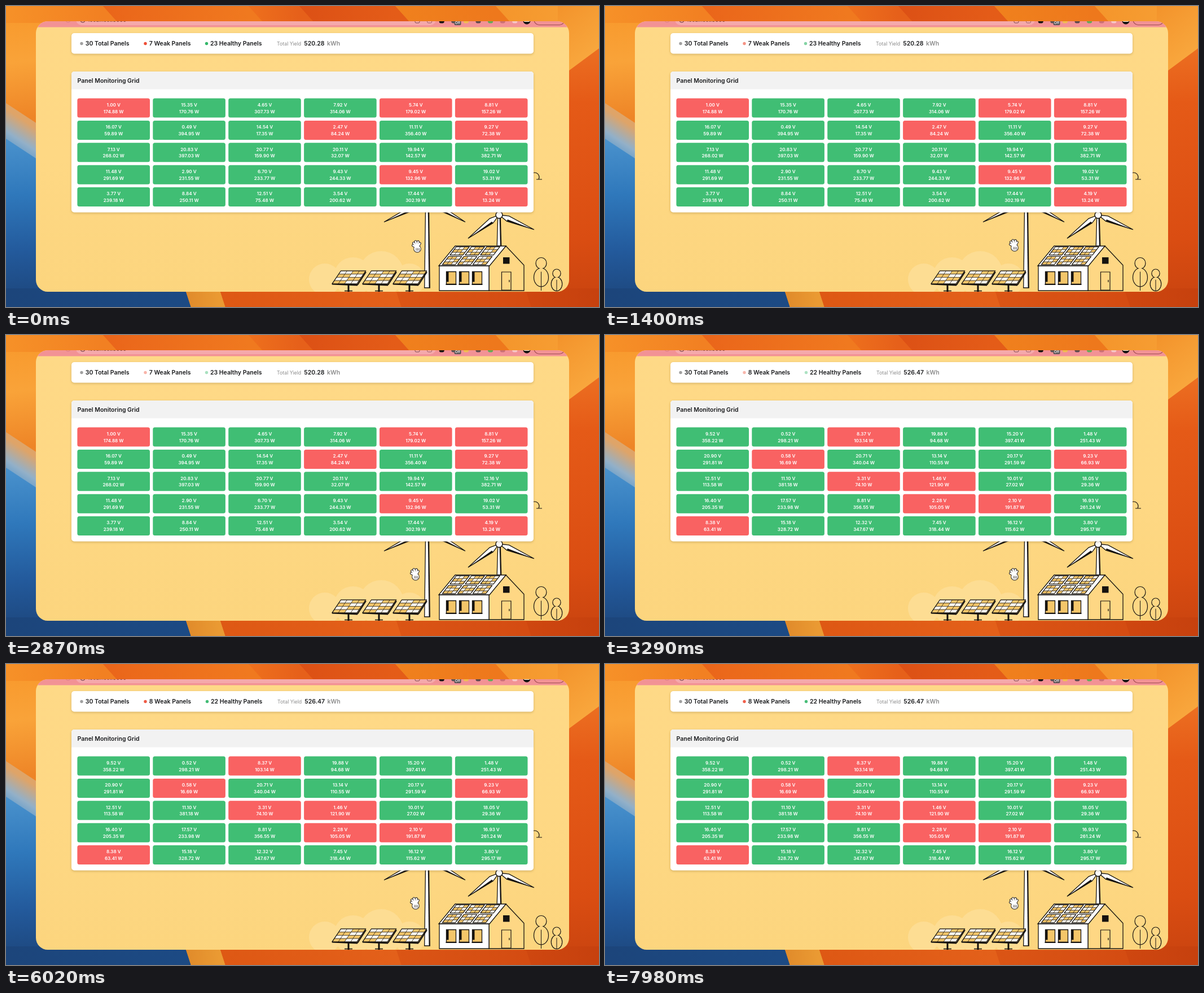
An HTML page with a canvas that plays this animation: 1051 by 533 pixels, repeating every 8 s.

```html
<!DOCTYPE html>
<html lang="en">
<head>
<meta charset="utf-8">
<title>Solar panel monitor</title>
<style>
html, body { margin: 0; width: 100%; height: 100%; overflow: hidden; background: #e8641a; }
canvas { display: block; width: 1051px; height: 533px; }
</style>
</head>
<body>
<canvas id="stage"></canvas>
<script>
const W = 1051, H = 533, LOOP = 8000, REFRESH = 3010;
const RED = '#f96262', GREEN = '#40be74', INK = '#15120f', CREAM = '#fed784', GOLD = '#f4c66a';
const win = { x: 53, y: 27, w: 945, h: 479 };

const canvas = document.getElementById('stage');
const dpr = window.devicePixelRatio || 1;
canvas.width = W * dpr;
canvas.height = H * dpr;
let c = canvas.getContext('2d');

// The text of the cells: volts and watts, before and after the refresh.
const states = [
  { total: '520.28', shift: 0, peak: 0, cells: `
    1.00 174.88, 15.35 170.76, 4.65 307.73, 7.92 314.06, 5.74 179.02, 8.81 157.26,
    16.07 59.89, 0.49 394.95, 14.54 17.35, 2.47 84.24, 11.11 356.40, 9.27 72.38,
    7.13 268.02, 20.83 397.03, 20.77 159.90, 20.11 32.07, 19.94 142.57, 12.16 382.71,
    11.48 291.69, 2.90 231.55, 6.70 233.77, 9.43 244.33, 9.45 132.96, 19.02 53.31,
    3.77 239.18, 8.84 250.11, 12.51 75.48, 3.54 200.62, 17.44 302.19, 4.19 13.24` },
  { total: '526.47', shift: 1, peak: 2250, cells: `
    9.52 358.22, 0.52 298.21, 8.37 103.14, 19.88 94.68, 15.20 397.41, 1.48 251.43,
    20.90 291.81, 0.58 16.69, 20.71 340.04, 13.14 110.55, 20.17 291.59, 9.23 66.93,
    12.51 113.58, 11.10 381.18, 3.31 74.10, 1.46 121.90, 10.01 27.02, 18.05 29.36,
    16.40 205.35, 17.57 233.98, 8.81 356.55, 2.28 105.05, 2.10 191.87, 16.93 261.24,
    8.38 63.41, 15.18 328.72, 12.32 347.67, 7.45 318.44, 16.12 115.62, 3.80 295.17` }
];
for (const s of states) {
  s.cells = s.cells.split(',').map(cell => {
    const [volts, watts] = cell.trim().split(' ');
    return { volts, watts, weak: volts < 10 && watts < 200 };
  });
  s.weak = s.cells.filter(cell => cell.weak).length;
}

function gradient(x0, y0, x1, y1, ...colors) {
  const g = c.createLinearGradient(x0, y0, x1, y1);
  colors.forEach((col, i) => g.addColorStop(i / Math.max(1, colors.length - 1), col));
  return g;
}

function paint(fill, stroke, width = 1.3) {
  if (fill) { c.fillStyle = fill; c.fill(); }
  if (stroke) { c.strokeStyle = stroke; c.lineWidth = width; c.stroke(); }
}

function poly(points, fill, stroke, width) {
  c.beginPath();
  points.forEach(p => c.lineTo(...p));
  c.closePath();
  paint(fill, stroke, width);
}

function line(x0, y0, x1, y1, width = 1.3, color = INK) {
  c.beginPath();
  c.moveTo(x0, y0);
  c.lineTo(x1, y1);
  paint(null, color, width);
}

function box(x, y, w, h, r, fill, stroke, width) {
  c.beginPath();
  c.roundRect(x, y, w, h, r);
  paint(fill, stroke, width);
}

function disc(x, y, r, fill, stroke, width) {
  c.beginPath();
  c.arc(x, y, r, 0, Math.PI * 2);
  paint(fill, stroke, width);
}

function text(str, x, y, size, weight, color, align = 'left') {
  c.font = `${weight} ${size}px Inter, sans-serif`;
  c.textAlign = align;
  c.fillStyle = color;
  c.fillText(str, x, y);
}

// Neighbouring slanted petals along one horizontal edge of the stage.
function petals(y, height, slant, stops) {
  stops.forEach(([x, from, to], i) => {
    const end = i + 1 < stops.length ? stops[i + 1][0] : W + 60;
    poly([[x, y], [end, y], [end + slant, y + height], [x + slant, y + height]],
      gradient(x, 0, end, 0, from, to));
  });
}

function wallpaper() {
  const left = win.x + 20, right = win.x + win.w - 20, bottom = win.y + win.h;
  petals(0, 50, 45, [
    [-60, '#f8972a', '#f28022'], [172, '#ea651a', '#f0791f'], [430, '#ee701d', '#e6601a'],
    [520, '#dc5015', '#e45c18'], [690, '#f0811d', '#ee781c'], [868, '#f4952b', '#f9a63a']
  ]);
  c.fillStyle = gradient(0, 0, 20, 200, '#f8972a', '#f9a339', '#ee8527');
  c.fillRect(0, 30, left, H);
  poly([[0, 172], [left, 220], [left, H], [0, H]],
    gradient(0, 182, -36, 237, '#dfa468', '#93b0c8', '#4a92cd'));
  poly([[0, 235], [left, 283], [left, H], [0, H]],
    gradient(0, 235, 0, H, '#4a92cd', '#2f78bb', '#235a9c', '#1c4479'));
  c.fillStyle = gradient(0, 50, 0, H, '#ee7424', '#e55a17', '#e05415', '#da4d12', '#c8430f');
  c.fillRect(right, 30, W - right, H);
  poly([[right, 0], [W, 0], [W, 75], [right, 129]], gradient(right, 0, W, 90, '#f3932b', '#f9a93f'));
  petals(bottom - 6, 40, 13, [
    [-60, '#1c4479', '#1c4a84'], [317, '#e08a2a', '#ea9a33'], [378, '#de5814', '#e3601a'],
    [690, '#db5515', '#d44c12'], [920, '#cf4710', '#c23e0d']
  ]);
}

function toolbar() {
  c.fillStyle = '#f29295';
  c.fillRect(win.x, win.y, win.w, 10.5);
  box(124, 14, 638, 20, 10, '#f5a9ab');
  disc(110, 25, 4, null, '#dc7e82', 1);
  disc(136, 25, 4, null, '#6d4142', 1.2);
  text('localhost:3000', 146, 28.4, 9.5, 400, '#6d4142');
  const icons = ['#7b4a4b', '#9a6061', INK, '#5b5254', '#f0bd52', '#5f4a4b', '#64a957', '#ca7073', '#f7c7c6'];
  icons.forEach((color, i) => box(725 + i * 21.6, 22, 8, 8, 2, i > 1 && color, color, 1));
  box(794.5, 25, 12, 9, 2, '#5b5254');
  text('Off', 800.5, 32.3, 6.5, 500, '#fff', 'center');
  disc(923, 26, 6.5, INK);
  box(918, 26, 10, 2, 1, '#fff');
  box(936, 15, 54, 18.5, 9, null, '#9d4b50', 1.2);
}

function blade(hx, hy, tx, ty) {
  const len = Math.hypot(tx - hx, ty - hy), root = len / 4, under = tx < hx ? -5 : 5;
  c.save();
  c.translate(hx, hy);
  c.rotate(Math.atan2(ty - hy, tx - hx));
  poly([[0, 0], [root, -under], [len, 0], [root, under]], '#fff', INK);
  poly([[root, under / 3], [root, under], [len, 0]], INK);
  c.restore();
}

function turbine(x, hub, bottom, width, tips) {
  poly([[x - width, hub], [x + width, hub], [x + width * 1.7, bottom], [x - width * 1.7, bottom]], '#fff', INK);
  line(x + width - 1, hub, x + width * 1.7 - 1, bottom, 1.5);
  tips.forEach(([tx, ty]) => blade(x, hub, tx, ty));
  disc(x, hub, 6, '#fff', INK, 1.5);
}

// A leaning solar module with a patchwork of lit cells.
function module(x, y, w, h, lean, cols, rows, phase = 0) {
  const at = (i, j) => [x + w * i / cols - lean * j / rows, y + h * j / rows];
  const area = (i, j, di, dj) => [at(i, j), at(i + di, j), at(i + di, j + dj), at(i, j + dj)];
  for (let i = 0; i < cols; i++) for (let j = 0; j < rows; j++)
    poly(area(i, j, 1, 1), (i + 2 * j + phase) % 4 < 2 ? '#fffaf0' : GOLD, INK, .6);
  poly(area(0, 0, cols, rows), null, INK, 1.2);
}

function groundPanel(x) {
  line(x + 29, 491, x + 29, 506, 3);
  line(x + 22, 504.5, x + 36, 504.5, 1.5);
  line(x, 492, x + 45, 494, 3);
  line(x + 45, 494, x + 60, 471, 2);
  module(x + 15.5, 469, 44, 23, 15.5, 4, 4);
}

function house() {
  const eave = 460, base = 504;
  poly([[886, 425], [918, eave - 1], [918, base], [856, base], [856, eave]], CREAM, INK);
  poly([[768, eave], [856, eave], [856, base], [768, base]], '#fff', INK);
  poly([[796, 425], [886, 425], [857, eave], [767, eave]], '#fff', INK);
  for (let i = 0; i < 3; i++) {
    module(798 + i * 27, 426.5, 23, 14.5, 11, 3, 3, i);
    module(784.5 + i * 27, 443.5, 23, 14.5, 11, 3, 3, i + 2);
    const x = 780.5 + i * 23;
    box(x, 470.5, 17, 22, 0, GOLD, INK);
    box(x, 470.5, 4, 18, 0, INK);
    line(x - 1, 493, x + 18, 493, 1.8);
  }
  box(881, 445, 11.5, 11.5, 0, INK);
  box(878.5, 471, 16.5, 32, 0, CREAM, INK, 1.2);
  line(892, 485, 892, 489);
}

// Two stacked lobes sharing one outline.
function tree(x, top, r, ground) {
  const crown = top + r, body = top + r * 3.5;
  const lobes = (grow, color) => {
    c.beginPath();
    c.ellipse(x, crown, r * .95 + grow, r + grow, 0, 0, 7);
    c.ellipse(x, body, r * 1.3 + grow, r * 1.65 + grow, 0, 0, 7);
    paint(color);
  };
  lobes(.6, INK);
  lobes(-.6, CREAM);
  line(x, body - r, x, ground, 1);
}

function scenery() {
  c.fillStyle = gradient(0, win.y, 0, win.y + win.h, '#fed987', '#fed884', '#fcd57e');
  c.fillRect(win.x, win.y, win.w, win.h);
  for (let i = 0; i < 4; i++) disc(565 + i * 50, 484 - i % 3 * 5, 28 + i % 3 * 6, '#fddd93');
  turbine(746.5, 345, 499, 2.8, [[670, 382.5], [814, 382.5]]);
  turbine(874, 370, 425, 2.2, [[819, 411.5], [936, 396], [890, 310]]);
  for (let i = 0; i < 3; i++) groundPanel(578 + i * 54);
  house();
  tree(948.5, 445.5, 10, 504);
  tree(976, 466, 7.5, 504);
  c.beginPath();
  c.arc(937, 303, 8, -2, .5);
  paint(null, INK, 1.1);
  line(940, 307, 950, 307, 1.1);
}

function card(y, h) {
  c.save();
  c.shadowColor = 'rgba(90,60,0,.25)';
  c.shadowBlur = 4 * dpr;
  c.shadowOffsetY = 1.5 * dpr;
  box(116, y, 819, h, 5, '#fff');
  c.restore();
}

function backdrop() {
  wallpaper();
  c.save();
  c.beginPath();
  c.roundRect(win.x, win.y, win.w, win.h, 21);
  c.clip();
  scenery();
  toolbar();
  card(48, 36.5);
  card(116, 249.5);
  box(116, 116, 819, 31.5, [5, 5, 0, 0], '#f2f2f2');
  text('Panel Monitoring Grid', 126.5, 136, 10.5, 600, '#191a1c');
  c.restore();
}

function grid({ cells }) {
  cells.forEach(({ volts, watts, weak }, i) => {
    const x = 126.4 + i % 6 * 133.9, y = 163.5 + Math.floor(i / 6) * 39.4;
    box(x, y, 128.6, 34, 3.5, weak ? RED : GREEN);
    text(volts + ' V', x + 64.3, y + 14.2, 8.1, 600, '#fff', 'center');
    text(watts + ' W', x + 64.3, y + 26.1, 8.1, 600, '#fff', 'center');
  });
}

function summary({ cells, weak, total, shift, peak }, t) {
  const label = (str, x, color = '#191a1c') => text(str, x, 70.3, 10.5, 600, color);
  disc(134, 66.5, 2.7, '#a0a0a0');
  c.globalAlpha = .7 + .3 * Math.cos((t - peak) / 1000 * Math.PI);
  disc(247, 66.5, 2.7, '#ee4d35');
  disc(355.5 + shift, 66.5, 2.7, '#34b76a');
  c.globalAlpha = 1;
  label(cells.length + ' Total Panels', 140.8);
  label(weak + ' Weak Panels', 253.7);
  label(cells.length - weak + ' Healthy Panels', 361.9 + shift);
  text('Total Yield', 480 + shift, 69.6, 8.8, 400, '#8d8d8d');
  label(total, 528.3 + shift);
  label('kWh', 569 + shift * .5, '#8b8b8b');
}

function hand(t) {
  const p = Math.min(1, Math.max(0, (t - 70) / 280));
  const k = p * p * (3 - 2 * p);
  const shape = (color, grow) => {
    for (let i = 0; i < 5; i++) {
      const a = -2.75 + i * .44, len = 8 + 2.2 * Math.sin(i * .8);
      line(0, 2, Math.cos(a) * len, 1 + Math.sin(a) * len, 2.9 + grow * 2, color);
    }
    c.beginPath();
    c.ellipse(0, 4, 5.8 + grow, 5.6 + grow, 0, 0, 7);
    paint(color);
  };
  c.save();
  c.translate(729 - 3 * k, 426 - 2 * k);
  c.lineCap = 'round';
  shape('#39342f', 1.1);
  shape('#fff', 0);
  for (let x = -2; x < 4; x += 2.6) line(x, 3, x, 7, .9, '#39342f');
  c.restore();
}

// The still parts are drawn once and reused.
const screen = c, still = canvas.cloneNode();
c = still.getContext('2d');
c.scale(dpr, dpr);
backdrop();
c = screen;
c.scale(dpr, dpr);

const start = performance.now();
function frame() {
  const t = (performance.now() - start) % LOOP;
  const state = states[t < REFRESH ? 0 : 1];
  c.drawImage(still, 0, 0, W, H);
  summary(state, t);
  grid(state);
  hand(t);
  requestAnimationFrame(frame);
}
frame();
</script>
</body>
</html>
```
